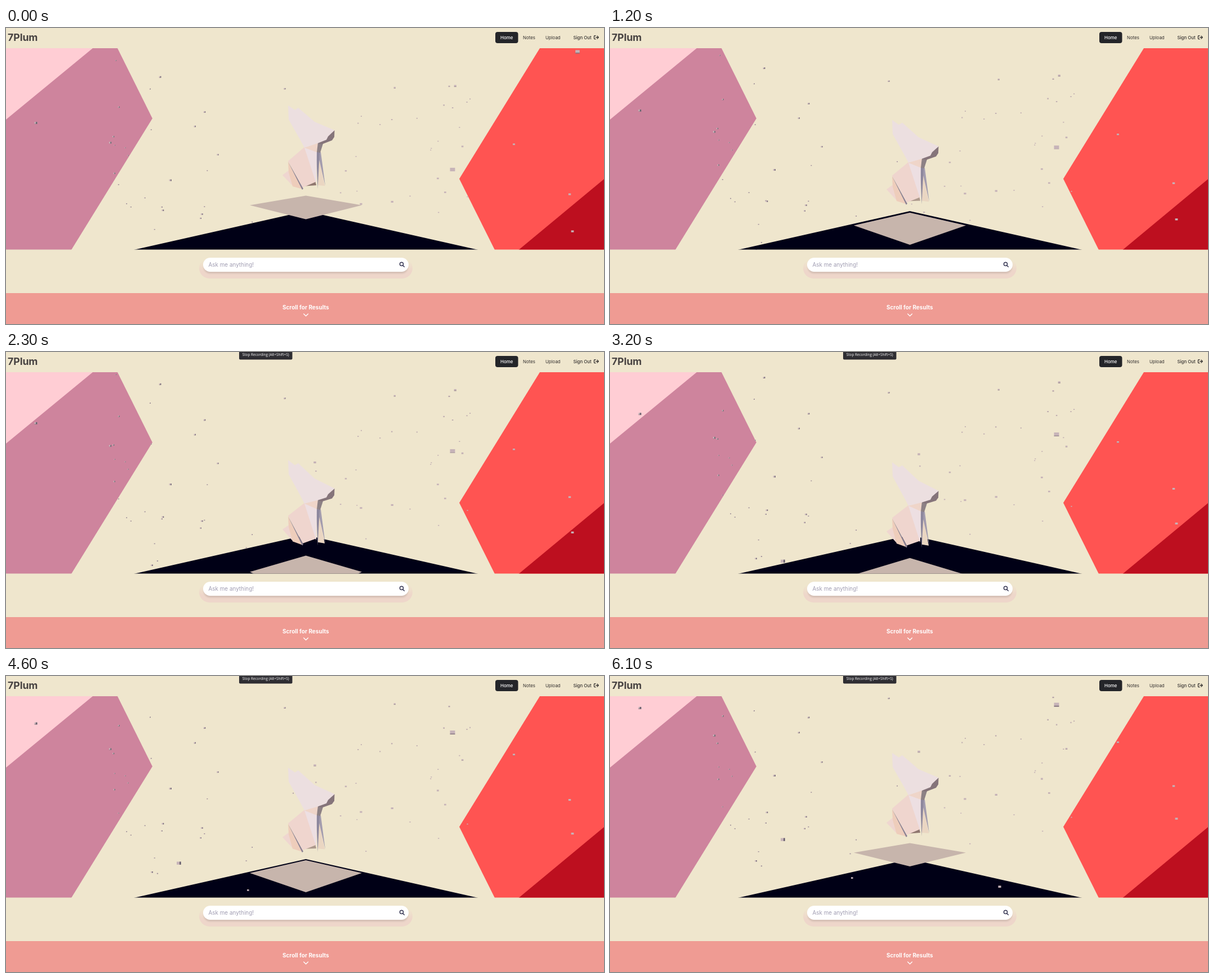
An HTML page with a canvas for the animation above (6200 ms loop, 1062 px wide and 527 px high).

```html
<!DOCTYPE html>
<html lang="en">
<head>
<meta charset="utf-8">
<title>Origami search</title>
<style>
  html, body { margin: 0; width: 100%; height: 100%; overflow: hidden; background: #efe6cd; }
  body { position: relative; font-family: Inter, sans-serif; }
  canvas, svg { position: absolute; left: 0; top: 0; width: 1062px; height: 527px; display: block; }
  .glow, .search { position: absolute; box-sizing: border-box; }
  .glow {
    left: 343px; top: 409px; width: 379px; height: 37px; border-radius: 19px;
    background: linear-gradient(#eed6c900 15%, #eed6ca 65%);
  }
  .search {
    left: 350px; top: 408.5px; width: 365px; height: 25px; border-radius: 13px;
    background: #fff; box-shadow: 0 4px 3px -1px #0000001c;
    padding-left: 9.5px; font-size: 9.9px; line-height: 25px; color: #a09db2;
  }
  .nav { font-size: 7.9px; fill: #34302f; }
  .nav .strong { font-weight: 500; }
  .tip { visibility: hidden; }
  .tip text { font: 6.4px "Open Sans", "Noto Sans", sans-serif; fill: #fff; text-anchor: middle; }
</style>
</head>
<body>
<canvas id="scene" width="1062" height="527"></canvas>
<div class="glow"></div>
<div class="search">Ask me anything!</div>
<svg viewBox="0 0 1062 527">
  <text x="3" y="23" font-size="17.6" font-weight="700" fill="#474241">7Plum</text>
  <rect x="869" y="7" width="40.5" height="20" rx="4" fill="#242529"/>
  <g class="nav">
    <text class="strong" x="878" y="19.6" fill="#fff">Home</text>
    <text x="918" y="19.6">Notes</text>
    <text x="958" y="19.6">Upload</text>
    <text class="strong" x="1007.5" y="19.6">Sign Out</text>
  </g>
  <g fill="none" stroke-linecap="round" stroke-linejoin="round">
    <path d="M1047 13.6h-1.5q-1 0-1 1v4q0 1 1 1h1.5M1047.3 16.6h4.7m-2-2.4 2.3 2.4-2.3 2.4" stroke="#2b2828" stroke-width="1.2"/>
    <path d="M705 423 707.3 425.3M705.6 420.3a3.1 3.1 0 1 1-6.2 0a3.1 3.1 0 1 1 6.2 0" stroke="#30304e" stroke-width="1.4"/>
    <path d="M528.7 509 532.6 512.8 536.5 509" stroke="#fff" stroke-width="1.3"/>
  </g>
  <rect y="472" width="1062" height="55" fill="#ef9b93"/>
  <text x="532.3" y="500.6" font-size="10" font-weight="700" fill="#fff" text-anchor="middle">Scroll for Results</text>
  <path d="M528.7 509 532.6 512.8 536.5 509" fill="none" stroke="#fff" stroke-width="1.3" stroke-linecap="round"/>
  <g class="tip" id="tip">
    <path d="M414 0H508.5V11.5q0 2-2 2H416q-2 0-2-2Z" fill="#2e2d32"/>
    <text x="461.2" y="7.4">Stop Recording (Alt+Shift+S)</text>
  </g>
</svg>
<script>
const LOOP = 6200, WIDTH = 1062, TOP = 36, BOTTOM = 394.5, CENTER = 532.5;
const ctx = document.getElementById('scene').getContext('2d');
const tip = document.getElementById('tip');

const shapes = rows => rows.map(([color, d]) => [color, new Path2D(d)]);

const walls = shapes([
  ['#ce849d', 'M0 36H198L260 161 116 395H0Z'],
  ['#ffcdd4', 'M0 36H154L0 163Z'],
  ['#ff5452', 'M948 36H1062V395H868L805 268.5Z'],
  ['#bd0f1f', 'M1062 269V395H910.5Z'],
]);
const ground = shapes([['#000016', 'M532.5 326 838.5 395H227Z']]);

const belly = shapes([['#8f776f', 'M531 281.5 549 272 551 280Z']]);
const fox = shapes([
  ['#efd6d0', 'M491 262 502 253.5 509 281Z'],               // tail
  ['#eecdbb', 'M501 238 502 257 509 282 527 287Z'],         // thigh
  ['#8a8193', 'M501 238 528 286 526 288Z'],
  ['#efd5ce', 'M530 212 501 237 527 284 550 274 552 221Z'], // body
  ['#ead6c2', 'M555 225 566 281 554 280Z'],                 // legs
  ['#a39cae', 'M552 221 559 221 567 281 557 238Z'],
  ['#8d879d', 'M551 221 557 221 553.5 286Z'],
  ['#eddfe2', 'M530 213 552 221 551 277Z'],                 // chest
  ['#efd5c9', 'M530 213 555 204 552 221Z'],
  ['#8d8185', 'M554 204 563 206 558 222 552 221Z'],         // neck
  ['#85747a', 'M583.5 182 583 194 579 200 561 207 554 205Z'], // jaw
  ['#ecdfe0', 'M501 138 513 146 519 142 548 167 583.5 182 572 193 569 199 554 205 530 213 523 200 502 163Z'],
]);

function seeded(seed) {
  return () => {
    seed = (seed * 16807) % 2147483647;
    return seed / 2147483647;
  };
}

// A cube's speed in px/s also gives its size; y is its place at the start.
function makeCubes(count) {
  const rand = seeded(41);
  return Array.from({ length: count }, () => {
    const across = rand() ** 1.2;
    const high = 45 + 60 * across;
    const low = 450 - 130 * across;
    return {
      x: 185 + 650 * across,
      y: high + (low - high) * rand(),
      speed: 7.5 + 9 * rand() ** 2.2,
    };
  });
}

const behind = [
  ...makeCubes(66),
  { x: 53, y: 169, speed: 18.4 },
  { x: 307, y: 462, speed: 28 },
  { x: 793, y: 252, speed: 33 },
  { x: 902, y: 207, speed: 14.6 },
  { x: 1001, y: 296, speed: 16.4 },
  { x: 1006, y: 362, speed: 17.7 },
  { x: 1015, y: 42, speed: 28 },
];
const inFront = [
  { x: 430, y: 448, speed: 14.5 },
  { x: 692, y: 491, speed: 19 },
];

function fill(list) {
  for (const [color, path] of list) {
    ctx.fillStyle = color;
    ctx.fill(path);
  }
}

function box(color, x, y, w, h) {
  ctx.fillStyle = color;
  ctx.fillRect(x, y, w, h);
}

function drawCube({ x, y, speed }, t) {
  const cy = y - speed * t;
  const w = speed * 0.27, h = w * 0.7;
  const left = x - w / 2, top = cy - h / 2;
  const under = Math.max(0, 1 - cy / 235) * h * 0.4;
  box('#c6b3b8', left, top, w, h);
  box('#85757f', left, top + h - under / 2, w, under);
  if (x < CENTER) {
    const side = w * (0.2 + 0.35 * (1 - x / CENTER));
    box('#6a626f', left + w - side, top, side, h);
  }
}

function drawPlatform(drop) {
  const side = 315.6 + drop * 1.26;
  ctx.fillStyle = '#c7b5ac';
  ctx.beginPath();
  ctx.moveTo(CENTER, 298.5 + drop * 1.06);
  ctx.lineTo(CENTER + 99.5, side);
  ctx.lineTo(CENTER, 340.5 + drop * 1.6);
  ctx.lineTo(CENTER - 99.5, side);
  ctx.fill();
}

function drawFox(drop) {
  ctx.save();
  // The nose side is nearer and travels further than the tail.
  ctx.transform(1, drop * 0.0013, 0, 1, 0, drop * 0.2545);
  ctx.globalAlpha = Math.max(0, 1 - (drop / 50) ** 2);
  fill(belly);
  ctx.globalAlpha = 1;
  fill(fox);
  ctx.restore();
}

function draw(t) {
  const drop = 33.5 * (Math.cos(0.25) - Math.cos(t + 0.25));
  ctx.clearRect(0, 0, WIDTH, 527);
  ctx.save();
  ctx.beginPath();
  ctx.rect(0, TOP, WIDTH, BOTTOM - TOP);
  ctx.clip();
  fill(walls);
  behind.forEach(cube => drawCube(cube, t));
  fill(ground);
  inFront.forEach(cube => drawCube(cube, t));
  drawPlatform(drop);
  drawFox(drop);
  ctx.restore();
  tip.style.visibility = t >= 1.5 ? 'visible' : 'hidden';
}

function tick() {
  const ms = performance.now() % LOOP;
  draw(Math.floor(ms / 100) / 10);
  requestAnimationFrame(tick);
}
tick();
</script>
</body>
</html>
```
